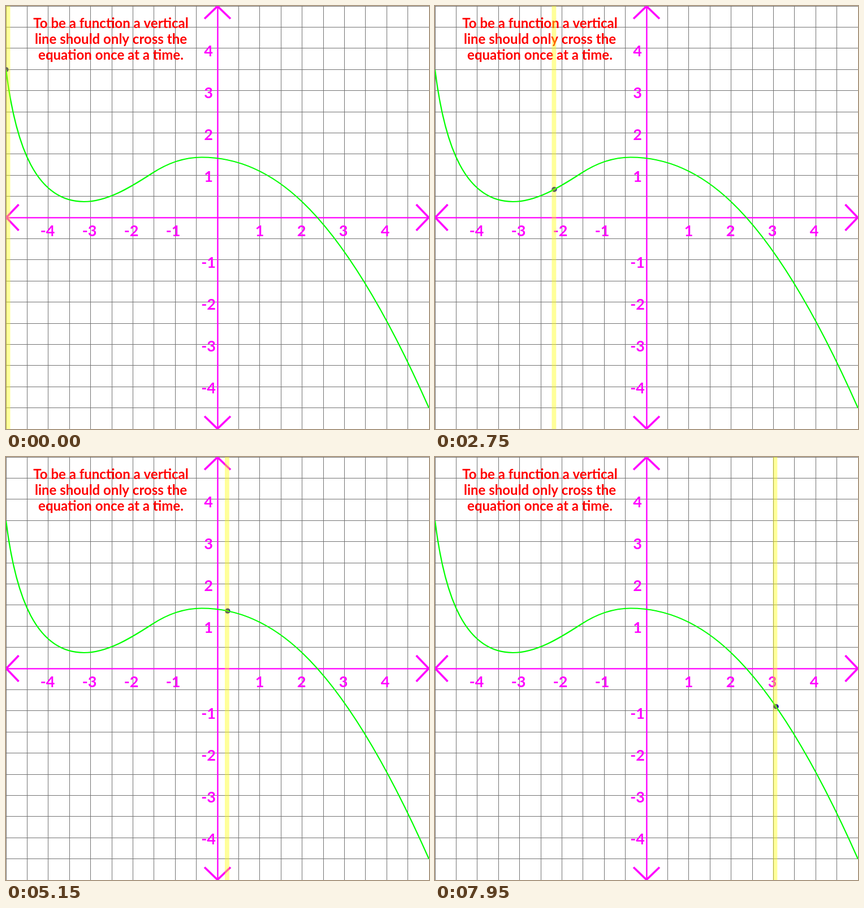
Animation of 748x748 px, one loop 8 s. Source, as an HTML page with a canvas:

```html
<!DOCTYPE html>
<html lang="en">
<head>
<meta charset="utf-8">
<title>Vertical line test</title>
<style>
  html, body { margin: 0; width: 100%; height: 100%; overflow: hidden; background: #fff; }
  canvas { display: block; width: 748px; height: 748px; }
</style>
</head>
<body>
<canvas id="stage" width="748" height="748"></canvas>
<script>
const SIZE = 748, MID = 374, LOOP = 8000, STEP = 50;
const MAGENTA = '#ff00ff';
const ctx = document.getElementById('stage').getContext('2d');

// Start point, then two handles and an end point per Bezier piece
const path = [
  [0, 112.5],
  [17, 250], [54, 346], [138, 346],
  [178, 346], [218, 322], [258, 296],
  [287, 277], [317, 267.5], [346, 267.5],
  [405, 267.5], [465, 290], [524, 346.5],
  [599, 418], [673, 541.5], [748, 711]
];

function bezier(piece, axis, u) {
  const [a, b, c, d] = piece.map(p => p[axis]);
  const v = 1 - u;
  return v * v * v * a + 3 * u * v * v * b + 3 * u * u * v * c + u * u * u * d;
}

// Height of the curve at x, found by bisection
function curveY(x) {
  let i = 0;
  while (i < path.length - 4 && x > path[i + 3][0]) i += 3;
  const piece = path.slice(i, i + 4);
  let low = 0, high = 1;
  for (let n = 0; n < 20; n++) {
    const u = (low + high) / 2;
    if (bezier(piece, 0, u) < x) low = u; else high = u;
  }
  return bezier(piece, 1, low);
}

function stroke(points, width) {
  ctx.beginPath();
  points.forEach(([x, y]) => ctx.lineTo(x, y));
  ctx.strokeStyle = MAGENTA;
  ctx.lineWidth = width;
  ctx.stroke();
}

function drawGrid() {
  ctx.fillStyle = '#737373';
  for (let i = 0; i < 20; i++) {
    const p = Math.floor(i * SIZE / 20);
    ctx.fillRect(p, 0, 1, SIZE);
    ctx.fillRect(0, p, SIZE, 1);
  }
}

function drawAxes() {
  const c = MID + 0.4;
  stroke([[0, c], [SIZE, c]], 2.4);
  stroke([[c, 0], [c, SIZE]], 2.4);
  for (let i = 0; i < 4; i++) {
    ctx.save();
    ctx.translate(MID, MID);
    ctx.rotate(i * Math.PI / 2);
    stroke([[351.5, -23], [373.5, 0], [351.5, 23]], 3.6);
    ctx.restore();
  }
}

function drawLabels() {
  ctx.textAlign = 'center';
  ctx.font = 'bold 27px Lato, sans-serif';
  ctx.fillStyle = MAGENTA;
  for (let n = -4; n <= 4; n++) {
    if (n === 0) continue;
    const [dx, dy] = n < 0 ? [-4.5, 15] : [0.5, 11];
    ctx.fillText(n, MID + 74 * n + dx, 407);
    ctx.fillText(n, 358, MID - 74 * n + dy);
  }
  ctx.font = 'bold 24px Lato, sans-serif';
  ctx.fillStyle = '#ff0000';
  [
    'To be a function a vertical',
    'line should only cross the',
    'equation once at a time.'
  ].forEach((line, i) => ctx.fillText(line, 185.5, 38.5 + 28 * i));
}

function drawCurve() {
  ctx.beginPath();
  ctx.moveTo(...path[0]);
  for (let i = 1; i < path.length; i += 3) {
    ctx.bezierCurveTo(...path[i], ...path[i + 1], ...path[i + 2]);
  }
  ctx.strokeStyle = '#00ff00';
  ctx.lineWidth = 2.2;
  ctx.stroke();
}

function drawDot(x) {
  ctx.fillStyle = '#000099';
  ctx.beginPath();
  ctx.arc(x, curveY(x), 4.6, 0, Math.PI * 2);
  ctx.fill();
}

function drawBand(x) {
  ctx.fillStyle = 'rgba(255, 255, 0, 0.4)';
  ctx.fillRect(x - 3.9, 0, 7.8, SIZE);
}

function draw(t) {
  const x = 3.6 + 0.0752 * t;
  // The dot starts at the edge, catches up with the band, then slowly leads it
  const lead = 0.0002 * t - 3.6 * Math.exp(-t / 300);
  ctx.fillStyle = '#fff';
  ctx.fillRect(0, 0, SIZE, SIZE);
  drawGrid();
  drawAxes();
  drawLabels();
  drawDot(x + lead);
  drawCurve();
  drawBand(x);
}

const start = performance.now();
function tick() {
  const t = (performance.now() - start) % LOOP;
  draw(Math.floor(t / STEP) * STEP);
  requestAnimationFrame(tick);
}
tick();
</script>
</body>
</html>
```
